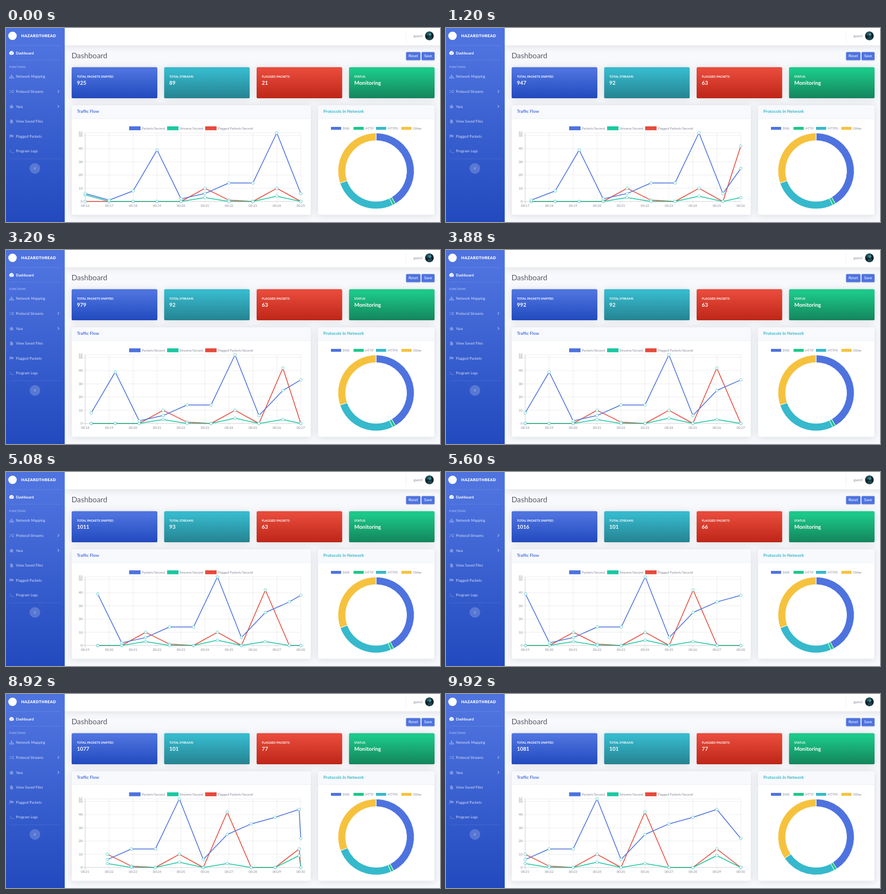
These frames come from a looping animation (800x359 px, 10000 ms). An HTML page:

```html
<!DOCTYPE html>
<html lang="en">
<head>
<meta charset="utf-8">
<title>Traffic dashboard</title>
<style>
html, body { margin: 0; width: 100%; height: 100%; overflow: hidden; background: #f8f9fc; }
svg { display: block; width: 800px; height: 359px; }
text { font: 6.8px Lato, "Open Sans", sans-serif; text-rendering: geometricPrecision; white-space: pre; }
.shadow { filter: drop-shadow(0 1.2px 6.7px rgba(58, 59, 69, .15)); }
.panel { fill: #fff; stroke: #e3e6f0; stroke-width: .5; }
.head { fill: #f8f9fc; }
.title { font-size: 7.9px; font-weight: 700; }
.caption { font-size: 5.65px; font-weight: 700; fill: #fff; }
.value { font-size: 9.9px; font-weight: 700; fill: #fff; }
.brand { font-size: 7.2px; font-weight: 900; letter-spacing: .4px; fill: #fff; }
.section { font-size: 5.2px; font-weight: 900; fill: #fff; fill-opacity: .4; }
.nav text { fill: #fff; fill-opacity: .8; }
.icons { fill: #fff; fill-opacity: .34; }
.outline { fill: none; stroke: #fff; stroke-linecap: round; stroke-linejoin: round; }
.rule { stroke: #fff; stroke-opacity: .16; stroke-width: .6; }
.btn text { font-size: 7.2px; fill: #fff; text-anchor: middle; }
.chart text { font-size: 6.05px; fill: #858796; }
.grid { stroke: #000; stroke-opacity: .12; stroke-width: .6; }
.zero { stroke-opacity: .3; }
.line { fill: none; stroke-width: 1.5; stroke-linejoin: round; }
.dot { fill: #fff; stroke: #4bc0c0; stroke-width: .75; }
.slice { stroke: #fff; stroke-width: 1; }
</style>
</head>
<body>
<svg viewBox="0 0 800 359">
  <defs>
    <linearGradient id="side" x2="0" y2="1"><stop offset=".1" stop-color="#4e73df"/><stop offset="1" stop-color="#224abe"/></linearGradient>
    <linearGradient id="blue" x2="0" y2="1"><stop offset=".1" stop-color="#4e73df"/><stop offset="1" stop-color="#224abe"/></linearGradient>
    <linearGradient id="cyan" x2="0" y2="1"><stop offset=".1" stop-color="#36b9cc"/><stop offset="1" stop-color="#258391"/></linearGradient>
    <linearGradient id="red" x2="0" y2="1"><stop offset=".1" stop-color="#e74a3b"/><stop offset="1" stop-color="#be2617"/></linearGradient>
    <linearGradient id="green" x2="0" y2="1"><stop offset=".1" stop-color="#1cc88a"/><stop offset="1" stop-color="#13855c"/></linearGradient>
    <clipPath id="round"><circle cx="780.5" cy="14.5" r="8"/></clipPath>
  </defs>

  <rect width="800" height="359" fill="#f8f9fc"/>

  <!-- top bar -->
  <rect class="shadow" x="108" y="-20" width="712" height="52" fill="#fff"/>
  <path d="M737.3 5V25" stroke="#e3e6f0" stroke-width=".6"/>
  <text x="751.3" y="16.8" fill="#858796">guest</text>
  <g clip-path="url(#round)">
    <rect x="772" y="6" width="17" height="17" fill="#10222b"/>
    <path d="M773 6h12l-3 6-6 3z" fill="#24505a"/>
    <circle cx="781.5" cy="12" r="2.6" fill="#3f8b94"/>
    <path d="M776 23q1-8 5.500-8t5.500 8z" fill="#1c434d"/>
  </g>

  <text x="120.700" y="56.400" style="font-size:13.9px" fill="#5a5c69">Dashboard</text>
  <g class="btn">
    <g fill="#4e73df" style="filter:drop-shadow(0 1px 1px rgba(58,59,69,.2))">
      <rect x="737.500" y="44.500" width="26.500" height="15" rx="1.600"/>
      <rect x="766" y="44.500" width="24" height="15" rx="1.600"/>
    </g>
    <text x="750.800" y="54.400">Reset</text>
    <text x="778" y="54.400">Save</text>
  </g>

  <!-- summary cards -->
  <g class="shadow">
    <rect x="121" y="72.500" width="158" height="57.500" rx="2.600" fill="url(#blue)"/>
    <rect x="291.500" y="72.500" width="157.700" height="57.500" rx="2.600" fill="url(#cyan)"/>
    <rect x="462" y="72.500" width="157.700" height="57.500" rx="2.600" fill="url(#red)"/>
    <rect x="632.300" y="72.500" width="157.700" height="57.500" rx="2.600" fill="url(#green)"/>
  </g>
  <g class="caption-row">
    <text class="caption" x="130.700" y="91.800">TOTAL PACKETS SNIFFED</text>
    <text class="caption" x="301" y="91.800">TOTAL STREAMS</text>
    <text class="caption" x="471.500" y="91.800">FLAGGED PACKETS</text>
    <text class="caption" x="642" y="91.800">STATUS</text>
    <text class="value" id="packets" x="130.700" y="105.200">925</text>
    <text class="value" id="streams" x="301" y="105.200">89</text>
    <text class="value" id="flagged" x="471.500" y="105.200">21</text>
    <text class="value" x="642" y="105.200">Monitoring</text>
  </g>

  <!-- panels -->
  <g class="shadow">
    <rect class="panel" x="121" y="142.700" width="441" height="203.200" rx="2.600"/>
    <rect class="panel" x="575" y="142.700" width="215" height="203.200" rx="2.600"/>
  </g>
  <path class="head" d="M121.300 167.500v-22q0-2.500 2.500-2.500h435.400q2.500 0 2.500 2.500v22zM575.300 167.500v-22q0-2.500 2.500-2.500h209.400q2.500 0 2.500 2.500v22z"/>
  <path d="M121 167.700h441M575 167.700h215" stroke="#e3e6f0" stroke-width=".6"/>
  <text class="title" x="130.700" y="157.300" fill="#4e73df">Traffic Flow</text>
  <text class="title" x="585" y="157.300" fill="#36b9cc">Protocols In Network</text>

  <g class="chart" id="chart"></g>

  <!-- sidebar -->
  <rect width="108.300" height="359" fill="url(#side)"/>
  <circle cx="12" cy="14.500" r="7.800" fill="#fff"/>
  <text class="brand" x="28" y="17.300">HAZARDTHREAD</text>
  <path class="rule" d="M7 32.500h94.500M7 59.500h94.500M7 242h94.500"/>
  <path d="M7.400 49.500a4 4 0 1 1 5.600 0z" fill="#fff"/>
  <path d="M10.200 48 12 44.500" stroke="#4e73df" stroke-width=".8"/>
  <text x="18.300" y="48.900" font-weight="700" style="font-weight:700" fill="#fff">Dashboard</text>
  <text class="section" x="6" y="74">FUNCTIONS</text>
  <g class="nav">
    <text x="18.300" y="92.300">Network Mapping</text>
    <text x="18.300" y="119.900">Protocol Streams</text>
    <text x="18.300" y="147.500">Yara</text>
    <text x="18.300" y="175.100">View Saved Files</text>
    <text x="18.300" y="202.800">Flagged Packets</text>
    <text x="18.300" y="230.400">Program Logs</text>
  </g>
  <g class="icons">
    <path d="M9 86.500h2.400v2.200H9zM6 91.300h2.400v2.200H6zM9 91.300h2.400v2.200H9zM12 91.300h2.400v2.200H12z"/>
    <ellipse cx="10.200" cy="146" rx="2.100" ry="2.800"/>
    <path d="M8.700 143.200a1.500 1.500 0 0 1 3 0z"/>
    <path d="M7.700 169.500h3.200l1.900 1.900v4.800H7.700z"/>
    <path d="M6.500 197h.8v7h-.8zM7.500 197.700q1.500-.8 3 0t3.200 0v4q-1.700.8-3.200 0t-3 0z"/>
  </g>
  <g class="outline" stroke-width=".9" stroke-opacity=".34">
    <path d="M10.200 88.700v2.500M7.200 91.200v-1.200h6v1.200M6.500 115.700h1.700l3.600 3.700h2M6.500 119.400h1.700l3.600-3.700h2M12.800 114.700l1.200 1-1.200 1M12.800 118.400l1.200 1-1.200 1M7 144l1.300.8M7 146.300h1.200M7 148.700l1.300-.8M13.400 144l-1.300.8M13.400 146.300h-1.200M13.400 148.700l-1.300-.8M6.800 225.500l2.300 2.300-2.300 2.300M10.300 230.500h3.600"/>
  </g>
  <path class="outline" stroke-width="1" stroke-opacity=".75" d="M95.700 115.300l2 2.200-2 2.200M95.700 142.900l2 2.200-2 2.200"/>
  <circle cx="53.300" cy="259.900" r="9.800" fill="#fff" fill-opacity=".2"/>
  <path class="outline" stroke-width="1" stroke-opacity=".65" d="M54.100 258l-1.800 1.900 1.800 1.900"/>
</svg>

<script>
const LOOP = 10000, TICK = 40, SLOTS = 10;
const LEFT = 146, STEP = 44.15, BASE = 321, UNIT = 127 / 52;
const BLUE = '#4e73df', TEAL = '#1cc8a2', RED = '#e74a3b';

const series = [
  { color: RED, data: [0, 0, 0, 0, 0, 10, 1, 0, 10, 0, 42, 0, 0, 14, 0] },
  { color: TEAL, data: [5, 0, 0, 0, 0, 3, 0, 0, 4, 0, 3, 0, 0, 9, 0] },
  { color: BLUE, data: [6, 1, 8, 39, 2, 6, 14, 14, 52, 6, 25, 33, 38, 44, 22] }
];
// start of each slide to the left
const slides = [910, 2910, 4930, 6962, 8902];

// time and value pairs, linear between
const counters = {
  packets: [160, 925, 680, 940, 880, 940, 1920, 964, 2640, 964, 2720, 973, 2880, 973,
    3880, 992, 3920, 1000, 4920, 1011, 5040, 1011, 5600, 1016, 6000, 1030, 6160, 1030,
    6720, 1055, 7200, 1055, 7920, 1060, 8360, 1060, 8520, 1072, 8640, 1072, 8680, 1077,
    8920, 1077, 9920, 1081],
  streams: [160, 89, 680, 92, 5040, 92, 5560, 101],
  flagged: [160, 21, 680, 63, 5040, 63, 5600, 66, 6000, 77]
};

// end angles of the ring slices, with the time each change starts
const ringColors = [BLUE, '#1cc88a', '#36b9cc', '#f6c23e'];
const rings = [
  { at: -LOOP, ends: [149.5, 154, 251.4, 360] },
  { at: 3980, ends: [152.4, 156.9, 250.3, 360] },
  { at: 6962, ends: [153, 157.3, 250, 360] },
  { at: 8902, ends: [147, 151.3, 235.8, 360] }
];

const chart = document.getElementById('chart');
const ease = p => 1 - (1 - Math.min(1, Math.max(0, p))) ** 4;
const yOf = v => BASE - v * UNIT;

function add(tag, attrs, text = '') {
  const el = document.createElementNS('http://www.w3.org/2000/svg', tag);
  for (const k in attrs) el.setAttribute(k, attrs[k]);
  el.textContent = text;
  return chart.appendChild(el);
}

function legend(x, y, w, h, gap, color, label) {
  add('rect', { x, y, width: w, height: h, fill: color });
  add('text', { x: x + w + gap, y: 187.6 }, label);
}

legend(227, 182, 21, 7.2, 2.3, BLUE, 'Packets/Second');
legend(297, 182, 21, 7.2, 2.3, TEAL, 'Streams/Second');
legend(367.2, 182, 21, 7.2, 2.3, RED, 'Flagged Packets/Second');
['DNS', 'HTTP', 'HTTPS', 'Other'].forEach((name, i) =>
  legend([599, 640.6, 682, 728.8][i], 183, 18.8, 5.4, 2.8, ringColors[i], name));

for (const v of [0, 10, 20, 30, 40, 50, 52]) {
  const y = yOf(v);
  add('path', { class: v ? 'grid' : 'grid zero', d: `M141.300 ${y}H543.400` });
  add('text', { x: 141, y: y + 2, 'text-anchor': 'end' }, v);
}
const labels = [];
for (let i = 0; i < SLOTS; i++) {
  const x = LEFT + i * STEP;
  add('path', { class: i ? 'grid' : 'grid zero', d: `M${x} 194V325.700` });
  labels.push(add('text', { x, y: 331, 'text-anchor': 'middle' }));
}
for (const s of series) {
  s.line = add('path', { class: 'line', stroke: s.color });
  s.dots = Array.from({ length: SLOTS }, () => add('circle', { class: 'dot', r: 2.5 }));
}
const slices = ringColors.map(fill => add('path', { class: 'slice', fill }));

function lookup(keys, t) {
  if (t <= keys[0]) return keys[1];
  for (let i = 2; i < keys.length; i += 2) {
    if (t <= keys[i]) {
      const p = (t - keys[i - 2]) / (keys[i] - keys[i - 2]);
      return Math.round(keys[i - 1] + p * (keys[i + 1] - keys[i - 1]));
    }
  }
  return keys[keys.length - 1];
}

function polar(r, deg) {
  const a = deg * Math.PI / 180;
  return `${682.2 + r * Math.sin(a)} ${264.6 - r * Math.cos(a)}`;
}

function slicePath(a, b) {
  const big = b - a > 180 ? 1 : 0;
  return `M${polar(70.3, a)}A70.3 70.3 0 ${big} 1 ${polar(70.3, b)}` +
    `L${polar(56.2, b)}A56.2 56.2 0 ${big} 0 ${polar(56.2, a)}Z`;
}

function drawLines(t) {
  const n = t < 920 ? 0 : Math.floor((t - 920) / 2000) + 1;
  const lag = n ? STEP * (1 - ease((t - slides[n - 1]) / 1000)) : 0;
  labels.forEach((el, i) => el.textContent = `00:${16 + n + i}`);
  for (const s of series) {
    const pts = s.dots.map((dot, i) => {
      const x = LEFT + i * STEP + (i < SLOTS - 1 ? lag : 0);
      const y = yOf(s.data[n + i]);
      dot.setAttribute('cx', x);
      dot.setAttribute('cy', y);
      return `${x} ${y}`;
    });
    s.line.setAttribute('d', 'M' + pts.join('L'));
  }
}

function drawRing(t) {
  let k = rings.length - 1;
  while (rings[k].at > t) k--;
  const to = rings[k], from = rings[Math.max(0, k - 1)];
  const p = ease((t - to.at) / 1000);
  let start = 0;
  slices.forEach((el, i) => {
    const end = from.ends[i] + (to.ends[i] - from.ends[i]) * p;
    el.setAttribute('d', slicePath(start, end));
    start = end;
  });
}

function frame() {
  const t = Math.floor(performance.now() % LOOP / TICK) * TICK;
  for (const id in counters) document.getElementById(id).textContent = lookup(counters[id], t);
  drawLines(t);
  drawRing(t);
  requestAnimationFrame(frame);
}
frame();
</script>
</body>
</html>
```
